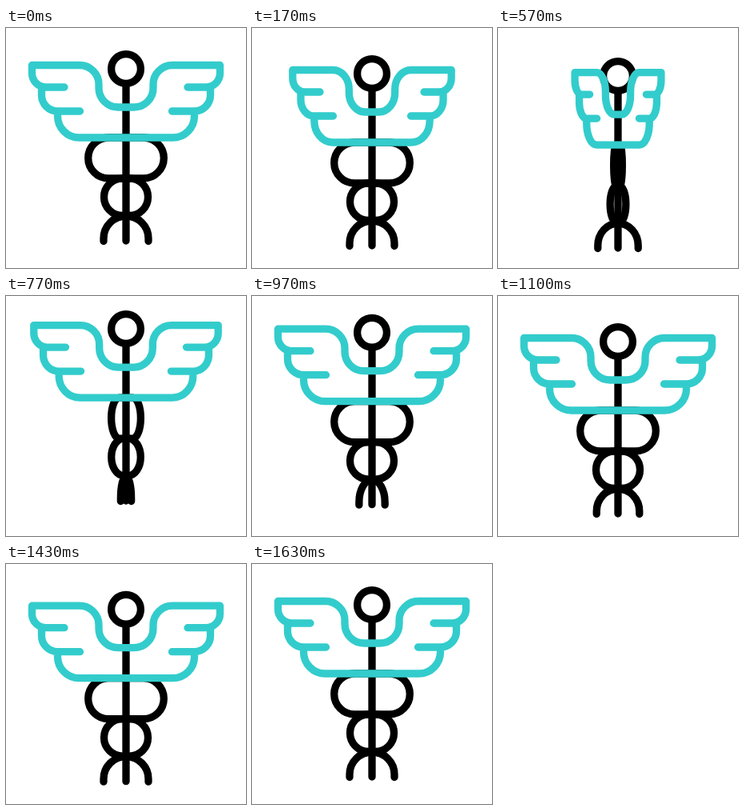
Recreate the animation shown at these times as an HTML page with a canvas. Size 300 px wide and 300 px high, loop 1.67 s.

```html
<!DOCTYPE html>
<html lang="en">
<head>
<meta charset="utf-8">
<title>Winged staff</title>
<style>
  html, body { margin: 0; width: 100%; height: 100%; overflow: hidden; background: #fff; }
  canvas { display: block; width: 100vw; height: 100vh; }
</style>
</head>
<body>
<canvas id="stage" width="300" height="300"></canvas>
<script>
const ctx = document.getElementById('stage').getContext('2d');
const LOOP = 1670, FPS = 30, LAST = 49;
const BLACK = '#000', TEAL = '#33cccc';

const smooth = u => u * u * (3 - 2 * u);
const gentle = u => 0.65 * u + 0.35 * smooth(u);

// Keys are [frame, value] pairs.
function track(keys, frame, ease) {
  if (frame <= keys[0][0]) return keys[0][1];
  for (let i = 1; i < keys.length; i++) {
    const [t0, v0] = keys[i - 1], [t1, v1] = keys[i];
    if (frame < t1) return v0 + (v1 - v0) * ease((frame - t0) / (t1 - t0));
  }
  return keys[keys.length - 1][1];
}

const BOB = [[1, 0], [13, 19.5], [25, -14.5], [36, 12.5], [49, 0]];
const WINGS = [[1, 1], [14, 0.31], [24, 1]];
const UPPER = [[9, 1], [19, 0.01], [28.5, 1]];
const LOWER = [[10, 1], [18, 0.33], [28, 1]];
const LEGS = [[15, 1], [24, 0.21], [34.5, 1]];

// Squeezes the outline towards the axis but keeps the line weight even.
function outline(color, squeeze, build) {
  ctx.save();
  ctx.scale(squeeze, 1);
  ctx.beginPath();
  build();
  ctx.restore();
  ctx.strokeStyle = color;
  ctx.stroke();
}

function coil(half, top, bottom) {
  const r = (bottom - top) / 2, mid = top + r, x = half - r;
  ctx.moveTo(-x, top);
  ctx.lineTo(x, top);
  ctx.arc(x, mid, r, -Math.PI / 2, Math.PI / 2);
  ctx.lineTo(-x, bottom);
  ctx.arc(-x, mid, r, Math.PI / 2, Math.PI * 1.5);
  ctx.closePath();
}

function legs() {
  ctx.moveTo(-28, 266.5);
  ctx.lineTo(-28, 263);
  ctx.arc(0, 263, 28, Math.PI, 0);
  ctx.lineTo(28, 266.5);
}

function wing(side) {
  const x = v => side * v;
  const corner = (x1, y1, x2, y2, r) => ctx.arcTo(x(x1), y1, x(x2), y2, r);
  ctx.moveTo(0, 99);
  corner(34, 99, 34, 75, 24);
  ctx.lineTo(x(34), 70.5);
  corner(34, 46.5, 58, 46.5, 24);
  ctx.lineTo(x(117.5), 46.5);
  ctx.lineTo(x(117.5), 56);
  corner(117.5, 74, 99, 74, 17.5);
  ctx.lineTo(x(77), 74);
  ctx.moveTo(x(105.5), 74);
  ctx.lineTo(x(105.5), 84);
  corner(105.5, 104, 85.5, 104, 20);
  ctx.lineTo(x(57.5), 104);
  ctx.moveTo(x(85.5), 104);
  ctx.lineTo(x(85.5), 110);
  corner(85.5, 137, 58.5, 137, 27);
  ctx.lineTo(0, 137);
}

function staff() {
  ctx.arc(0, 51, 18.4, 0, Math.PI * 2);
  ctx.moveTo(0, 70);
  ctx.lineTo(0, 266);
}

function draw(frame) {
  ctx.setTransform(1, 0, 0, 1, 0, 0);
  ctx.fillStyle = '#fff';
  ctx.fillRect(0, 0, 300, 300);
  ctx.translate(150, track(BOB, frame, gentle));
  ctx.lineWidth = 9.3;
  ctx.lineCap = ctx.lineJoin = 'round';

  outline(BLACK, track(LEGS, frame, smooth), legs);
  outline(BLACK, track(LOWER, frame, smooth), () => coil(27.5, 188, 234.5));
  outline(BLACK, track(UPPER, frame, smooth), () => coil(47.3, 137, 188));
  outline(BLACK, 1, staff);
  outline(TEAL, track(WINGS, frame, smooth), () => { wing(-1); wing(1); });
}

function tick() {
  const t = performance.now() % LOOP;
  draw(Math.min(LAST, Math.floor(t * FPS / 1000 + 0.12)));
  requestAnimationFrame(tick);
}
tick();
</script>
</body>
</html>
```
